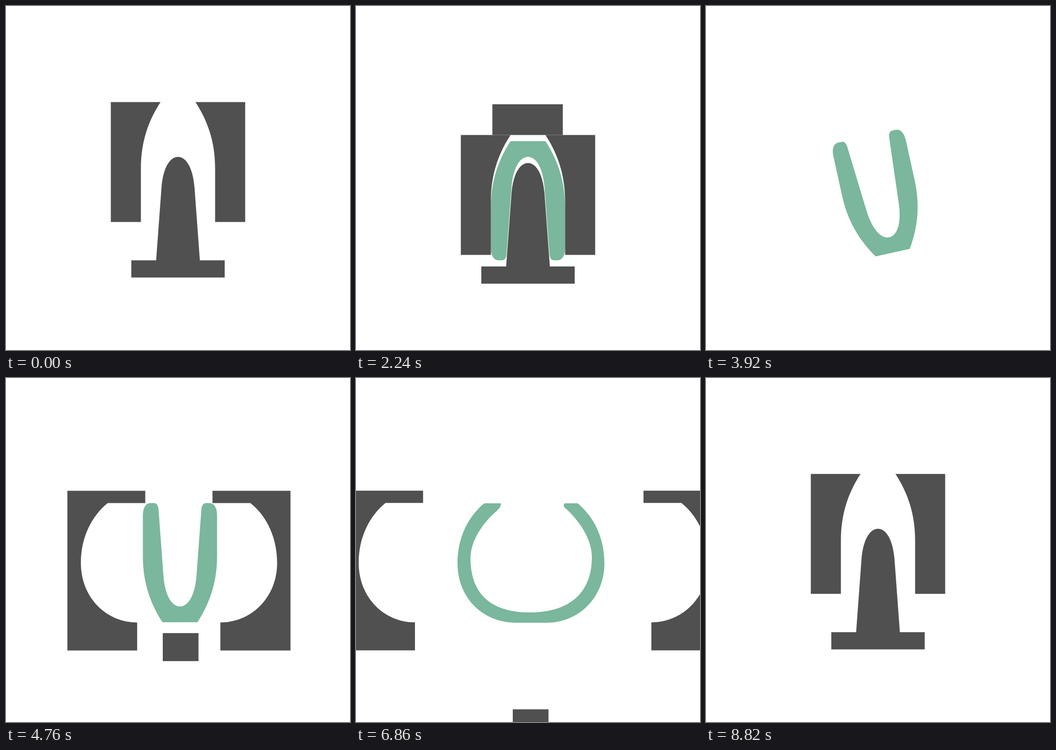
Recreate the animation shown at these times as an HTML page. Size 700 by 700 pixels, loop 8960 ms.

```html
<!DOCTYPE html>
<html lang="en">
<head>
<meta charset="utf-8">
<title>Glass forming</title>
<style>
  html, body { margin: 0; width: 100%; height: 100%; overflow: hidden; background: #fff; }
  svg { display: block; width: 100%; height: 100%; }
  .steel { fill: #505050; }
  .glass { fill: #7ab79d; }
  .arrow { fill: none; stroke: #c8c8c8; stroke-width: 5; stroke-linecap: round; stroke-linejoin: round; }
</style>
</head>
<body>
<svg viewBox="0 0 700 700">
  <defs>
    <path id="tip" d="M0 -28V0M-10 -10.5L0 0L10 -10.5"/>
  </defs>
  <path id="glass" class="glass"/>
  <g class="steel">
    <path id="plunger" d="M255 517.5H305.5L316.5 368C320 328 334 307 350 307C366 307 380 328 383.5 368L394.5 517.5H445V552.5H255Z"/>
    <path id="mold" d="M213.3 195.5H314.5C285 240.5 274.5 285.5 274.5 330V439.5H213.3ZM486.7 195.5H385.5C415 240.5 425.5 285.5 425.5 330V439.5H486.7Z"/>
    <rect id="cap" x="277.5" width="143.3" height="62.5"/>
    <path id="left" d="M179 230H337.5V255H261C228 282 206.5 325 206.5 377C206.5 447 258 498 321 498V555H179Z"/>
    <path id="right" d="M532.7 230H374V255H451C484 281 505.5 325 505.5 377C505.5 447 453 498 390 498V555H532.7Z"/>
    <rect id="plug" x="319" y="498" width="72.7" height="57"/>
  </g>
  <g class="arrow">
    <use id="airIn" href="#tip"/>
    <use id="airLeft" href="#tip"/>
    <use id="airRight" href="#tip"/>
  </g>
</svg>
<script>
const STEP = 140, COUNT = 64;
const el = id => document.getElementById(id);
const clamp = v => Math.min(1, Math.max(0, v));
const ramp = (n, from, to) => clamp((n - from) / (to - from));
const lerp = (a, b, t) => a + (b - a) * t;

// The three glass outlines share one sequence of commands so they can blend.
const GOB = `M368 305C376 303 380 294 380 285C380 275 380 260 380 245
C380 215 370 200 355 200L345 200C330 200 320 215 320 245
C320 260 320 275 320 285C320 294 324 303 332 305L334 306
C336 306.5 338 307 340 307C342 307 343 307 345 307C347 307 348 307 350 307
C352 307 353 307 355 307C357 307 358 307 360 307C362 307 364 306.5 366 306Z`;
const PARISON = `M410 517.5C419 517.5 425.5 509 425.5 492C425.5 467 425.5 437 425.5 409.6
C425.5 365 415 320 385.5 275L314.5 275C285 320 274.5 365 274.5 409.6
C274.5 437 274.5 467 274.5 492C274.5 509 281 517.5 290 517.5L297 517.5
C303 517.5 306 512 306.5 503C309.8 458 313.2 413 316.5 368C320 328 334 307 350 307
C366 307 380 328 383.5 368C386.8 413 390.2 458 393.5 503C394 512 397 517.5 403 517.5Z`;
const VESSEL = `M261 255C256 259 251.4 263.5 247 268.2C222.1 295.1 206.5 332.8 206.5 377
C206.5 447 258 498 325 498L388 498C453 498 505.5 447 505.5 377
C505.5 332.8 489.9 295.1 465 268.2C460.6 263.5 456 259 451 255L426 255
C421 256 422 262 426 265C456 291 480 330 480 364C480 436 436 477 354 477
C272 477 233 437 233 367C233 330 258 295 289 268C293 264 295 260 295 255Z`;

const mapNums = (path, fn) => {
  let i = 0;
  return path.replace(/[\d.]+/g, v => +fn(+v, i++).toFixed(2));
};
const blend = (a, b, t) => {
  const nums = b.match(/[\d.]+/g);
  return mapNums(a, (v, i) => lerp(v, +nums[i], t));
};
const TURNED = mapNums(PARISON, (v, i) => (i % 2 ? 772 : 704) - v);

const put = (id, transform) => el(id).setAttribute("transform", transform);
const move = (id, x, y) => put(id, `translate(${x} ${y})`);
const show = (id, on) => { el(id).style.display = on ? "" : "none"; };

function drawGlass(n) {
  let d, t;
  if (n < 16) {
    d = blend(GOB, PARISON, ramp(n, 7, 14));
    t = `translate(0 ${lerp(-300, 0, ramp(n, 1, 5))})`;
  } else if (n < 32) {
    const angle = Math.min(180, Math.max(0, 33.5 * (n - 23)));
    const x = 4 * angle / 180, y = -20.5 * ramp(n, 23, 31);
    d = PARISON;
    t = `translate(${x} ${y}) rotate(${angle} 350 396.25)`;
  } else {
    d = blend(TURNED, VESSEL, ramp(n, 36, 42));
    t = `translate(0 ${n < 56 ? 0 : 54 + 57 * (n - 56)})`;
  }
  el("glass").setAttribute("d", d);
  put("glass", t);
  show("glass", n > 1);
}

function drawPress(n) {
  const enter = Math.min(0, -491 + 70.1 * (n - 56));
  const part = n < 16 ? 0 : 12.5 + 75 * (n - 16);
  const early = n < 40;
  const moldY = early ? 79.5 * ramp(n, 7, 14) - part : enter;
  move("plunger", 0, early ? part : enter);
  move("mold", 0, moldY);
  move("cap", 0, early ? 133 + (n < 7 ? 65 * (n - 7) : moldY) : -200);
}

function drawBlow(n) {
  const wait = Math.max(0, 34.66 - n);
  const open = Math.max(0, n - 45.65);
  const lift = -0.8 * clamp(wait + open);
  move("left", -82 * wait - 60 * open, lift);
  move("right", 70 * wait + 63 * open, lift);
  move("plug", 0, 32 * wait + 52.6 * open);
}

function drawAir(n) {
  const out = ramp(n, 40, 43);
  const sides = n > 40 && n < 46;
  move("airIn", 356, 218.5 + 9.33 * (n - 36));
  put("airLeft", `translate(${lerp(356, 284, out)} ${lerp(285, 389.5, out)}) rotate(32)`);
  put("airRight", `translate(${lerp(356, 466.5, out)} ${lerp(292, 390, out)}) rotate(-48)`);
  show("airIn", n > 35 && n < 41);
  show("airLeft", sides);
  show("airRight", sides);
}

let last = -1;
function tick(now) {
  const n = Math.floor(now / STEP) % COUNT;
  if (n !== last) {
    last = n;
    drawGlass(n);
    drawPress(n);
    drawBlow(n);
    drawAir(n);
  }
  requestAnimationFrame(tick);
}
const start = performance.now();
tick(0);
requestAnimationFrame(function loop() {
  tick = now => {
    const n = Math.floor(Math.max(0, now - start) / STEP) % COUNT;
    if (n !== last) {
      last = n;
      [drawGlass, drawPress, drawBlow, drawAir].forEach(draw => draw(n));
    }
    requestAnimationFrame(tick);
  };
  tick(performance.now());
});
</script>
</body>
</html>
```
